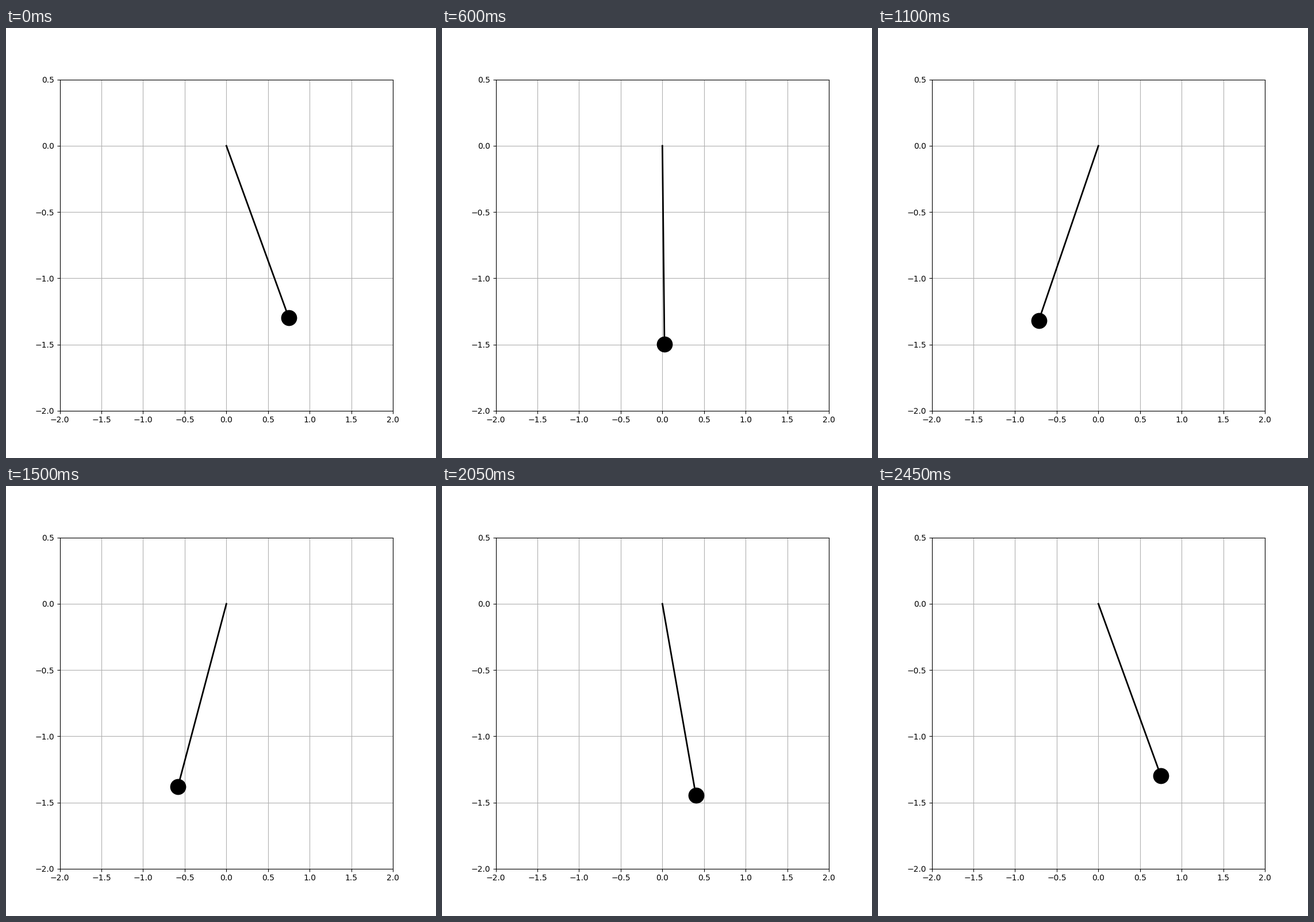
Animation of 748x748 px, one loop 2.5 s. Source, as a matplotlib script:

```python
import numpy as np
import matplotlib.pyplot as plt
from matplotlib.animation import FuncAnimation

SIZE, DPI = 748, 100
FRAMES, INTERVAL = 50, 50
LENGTH = 1.5
START_ANGLE = np.pi / 6

fig, ax = plt.subplots(figsize=(SIZE / DPI, SIZE / DPI), dpi=DPI)
ax.set_xlim(-2, 2)
ax.set_ylim(-2, 0.5)
ax.grid(True)

rod, = ax.plot([], [], "k-", lw=2)
bob, = ax.plot([], [], "ko", ms=20, mew=0)


def update(i):
    # One full swing, with both end points included
    angle = START_ANGLE * np.cos(2 * np.pi * i / (FRAMES - 1))
    x, y = LENGTH * np.sin(angle), -LENGTH * np.cos(angle)
    rod.set_data([0, x], [0, y])
    bob.set_data([x], [y])
    return rod, bob


anim = FuncAnimation(fig, update, frames=FRAMES, interval=INTERVAL,
                     repeat=True, repeat_delay=0)
plt.show()
```
